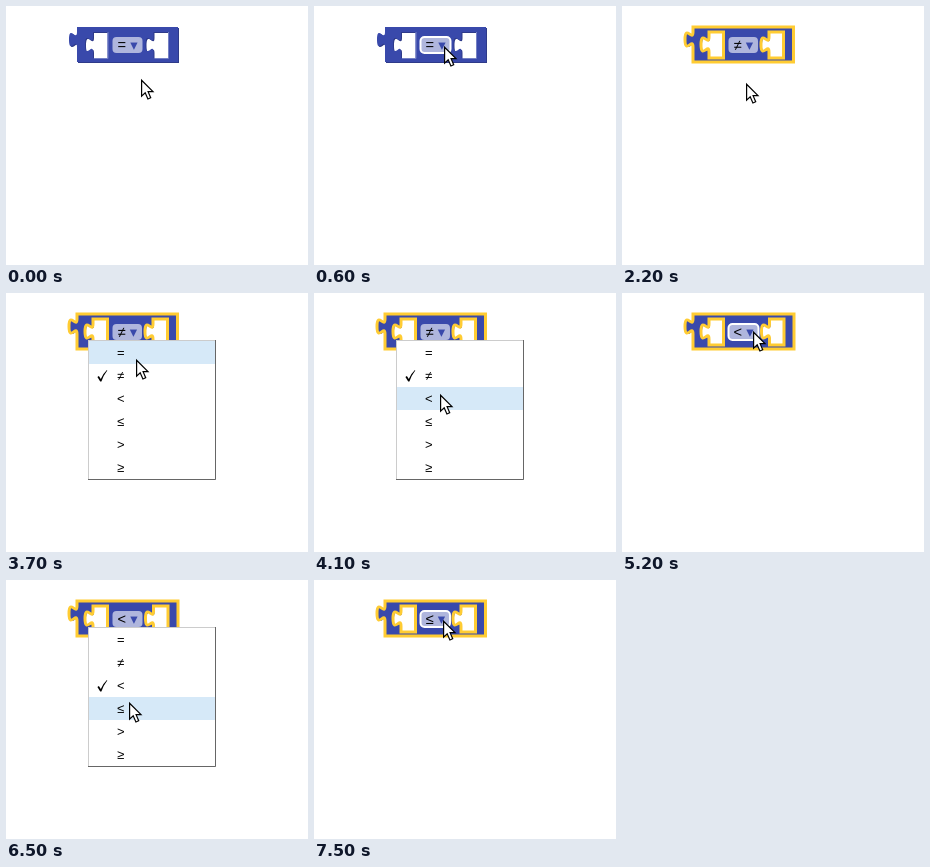
An HTML page for the animation above (8 s loop, 302 by 259 pixels).

```html
<!DOCTYPE html>
<html lang="en">
<head>
<meta charset="utf-8">
<title>Comparison block dropdown</title>
<style>
  html, body { margin: 0; width: 100%; height: 100%; overflow: hidden; background: #fff; }
  svg { display: block; width: 100%; height: 100%; }
  text { font-family: "Liberation Sans", Arial, sans-serif; fill: #000; }
  .label { font-size: 14.67px; }
  .label .arrow { font-family: "DejaVu Sans", sans-serif; fill: #3949ab; }
  .item { font-size: 13px; }
</style>
</head>
<body>
<svg viewBox="0 0 302 259" xmlns="http://www.w3.org/2000/svg">
  <path id="shade" fill="#2e3a89" fill-rule="evenodd" transform="translate(1 1)"/>
  <path id="block" fill="#3949ab" fill-rule="evenodd" stroke="#fc3" stroke-width="3"/>
  <path id="shine" fill="none" stroke="#7480c4"/>
  <rect id="field" x="106.5" y="31" height="16" rx="4" fill="#fff" fill-opacity=".6" stroke="#fff" stroke-width="2"/>
  <text id="label" class="label" x="111.5" y="44"><tspan id="op">=</tspan> <tspan class="arrow">▾</tspan></text>
  <g id="menu">
    <rect x="82.5" y="47.5" width="127" height="139" fill="#fff" stroke="#ccc"/>
    <path d="M209.5 47V186.5H82" fill="none" stroke="#666"/>
    <rect id="hover" x="83" width="126" height="23" fill="#d6e9f8"/>
    <g id="items"></g>
    <path id="check" d="M91.4 61L92.9 60.1L94.8 63Q97 57.6 100.9 54L101.3 54.4Q97.6 59 95.4 65.5H94.2Z"/>
  </g>
  <path id="cursor" fill="#fff" stroke="#000" stroke-width="1.2"
    d="M.6 1.3V17.2L4.2 13.8L6.9 20L9.7 18.8L7.1 12.7H12Z"/>
</svg>
<script>
const LOOP = 8000, STEP = 100, ROW = 23, MENU_TOP = 48;
const FIELD_X = 111.5, SOCKET_W = 14.5, BOW = 1.6;
const OPS = ["=", "≠", "<", "≤", ">", "≥"];
const OPEN = [[1000, 2200], [3400, 4500], [5700, 6800]];

// The pointer goes back and forth between the field and the next row
const HOME = { x: 135, y: 73 };
const MOVES = [
  { from: 100, to: 600, x: 130, y: 40 },
  { from: 1100, to: 1800, x: 124, y: 77 },
  { from: 2300, to: 2800, x: 131, y: 40 },
  { from: 3500, to: 4100, x: 126, y: 101 },
  { from: 4400, to: 5200, x: 131, y: 38 },
  { from: 5400, to: 5500, x: 129, y: 37 },
  { from: 5600, to: 6500, x: 123, y: 122 },
  { from: 6900, to: 7500, x: 129, y: 40 }
];

const $ = id => document.getElementById(id);
const show = (el, on) => el.setAttribute("visibility", on ? "inherit" : "hidden");
const easeOut = p => 1 - (1 - p) ** 1.4;
const mix = (a, b, k) => a + (b - a) * k;

const tabDown = "v5c0 10-8-8-8 7.5s8-2.5 8 7.5";
const tabUp = "c0-10-8 8-8-7.5s8 2.5 8-7.5";
const socket = right => `M${right - SOCKET_W} 26${tabDown}V52H${right}V26Z`;
const glint = right => `M${right - SOCKET_W + 1} 52.5H${right + .5}V26`;

$("items").innerHTML = OPS.map((op, i) =>
  `<text class="item" x="111" y="${64 + ROW * i}">${op.replace("<", "&lt;")}</text>`).join("");

// The block is as wide as its label needs
function layout(op) {
  $("op").textContent = op;
  const width = $("label").getComputedTextLength();
  const first = FIELD_X - 10, second = FIELD_X + width + 30.5;
  const d = `M71 21H${second + 10}V56H71V41${tabUp}Z` + socket(first) + socket(second);
  $("block").setAttribute("d", d);
  $("shade").setAttribute("d", d);
  $("shine").setAttribute("d", glint(first) + glint(second));
  $("field").setAttribute("width", width + 10);
}

function pointerAt(t) {
  let { x, y } = HOME;
  for (const m of MOVES) {
    if (t <= m.from) break;
    const p = Math.min(1, (t - m.from) / (m.to - m.from));
    const k = easeOut(p);
    x = mix(x, m.x, k) + BOW * Math.sin(Math.PI * p);
    y = mix(y, m.y, k);
  }
  return [Math.round(x), Math.round(y)];
}

function draw(time) {
  const t = Math.floor((time % LOOP) / STEP) * STEP;
  const [x, y] = pointerAt(t);
  const open = OPEN.some(([from, to]) => t >= from && t < to);
  const chosen = OPEN.filter(span => t >= span[1]).length;
  const selected = t >= OPEN[0][0];
  const overField = x >= 106 && x <= 136 && y >= 31 && y < 47;
  const row = Math.floor((y - MENU_TOP) / ROW);

  layout(OPS[chosen]);
  $("block").setAttribute("stroke-opacity", selected ? 1 : 0);
  show($("shine"), !selected);
  $("field").setAttribute("stroke-opacity", overField ? 1 : 0);
  show($("menu"), open);
  show($("hover"), open && row >= 0);
  $("hover").setAttribute("y", MENU_TOP + ROW * Math.max(0, row));
  $("check").setAttribute("transform", `translate(0 ${ROW * chosen})`);
  $("cursor").setAttribute("transform", `translate(${x} ${y})`);
}

const start = performance.now();
function tick() {
  draw(performance.now() - start);
  requestAnimationFrame(tick);
}
tick();
</script>
</body>
</html>
```
